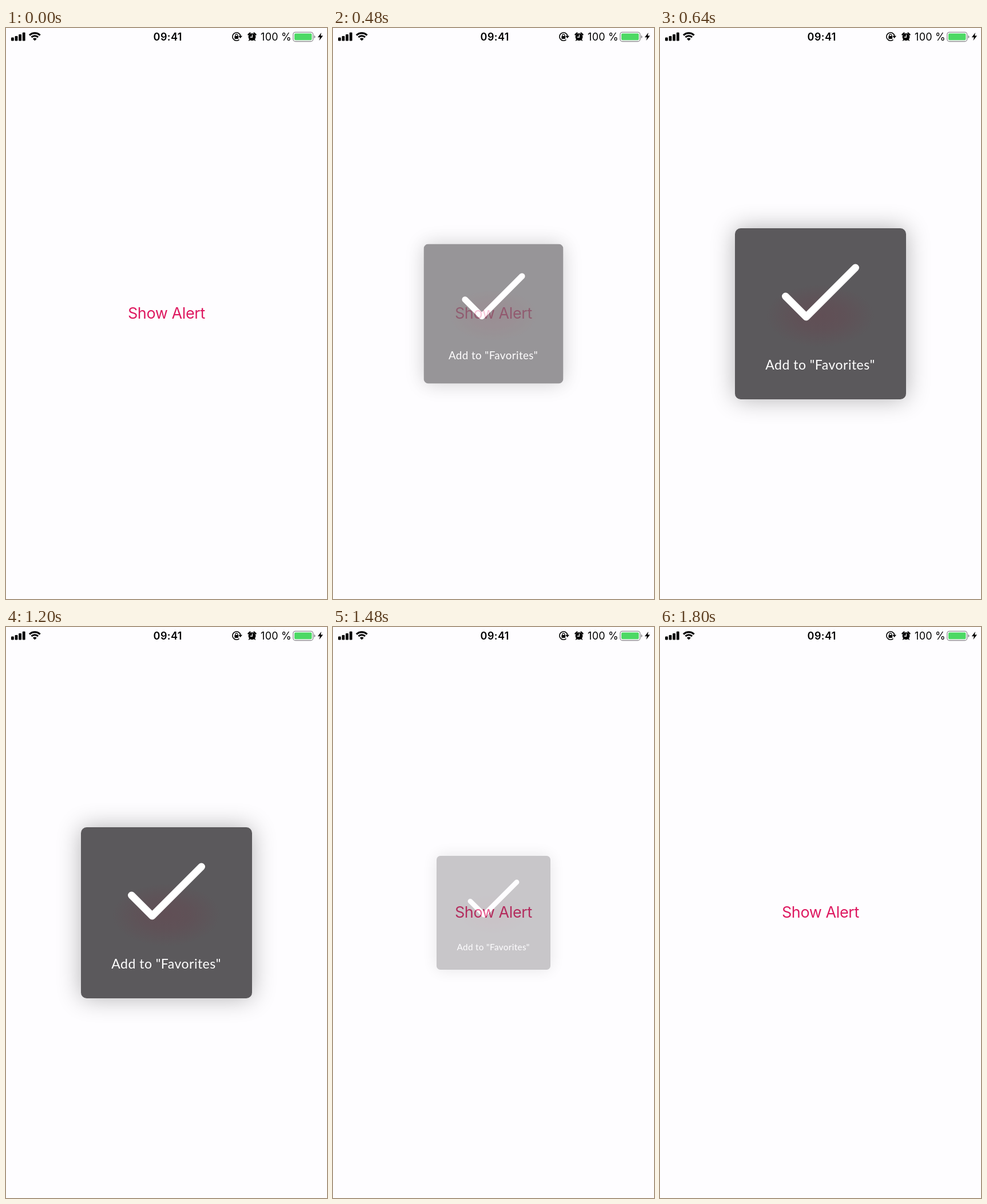
Animation of 561x998 px, one loop 2000 ms. Source, as an HTML page:

```html
<!DOCTYPE html>
<html lang="en">
<head>
<meta charset="utf-8">
<title>Alert</title>
<style>
  @property --p {
    syntax: "<number>";
    inherits: false;
    initial-value: 0;
  }

  html, body {
    margin: 0;
    width: 100%;
    height: 100%;
    overflow: hidden;
    background: #fefdff;
  }

  svg { display: block; }

  .screen {
    position: absolute;
    left: 0;
    top: 0;
  }

  .status text {
    font: 400 18px Inter, Roboto, sans-serif;
    text-anchor: middle;
    letter-spacing: .2px;
  }

  .status .clock {
    font-weight: 600;
    letter-spacing: .4px;
  }

  .button {
    font: 400 27px Inter, Roboto, sans-serif;
    letter-spacing: -.4px;
    text-anchor: middle;
    fill: #de1a61;
    animation: press 2s step-end infinite;
  }

  .alert {
    position: absolute;
    left: 131px;
    top: 349.5px;
    width: 299px;
    height: 299px;
    border-radius: 10px;
    background:
      radial-gradient(95px 55px at 149px 153px, rgba(110, 55, 70, .3), rgba(110, 55, 70, .22) 45%, rgba(110, 55, 70, 0)),
      #5b595c;
    box-shadow: 0 0 42px rgba(0, 0, 0, .3);
    opacity: var(--p);
    transform: scale(calc(.5 + .5 * var(--p)));
    animation: pop 2s step-end infinite;
  }

  .alert text {
    font: 400 23px Lato, "Open Sans", sans-serif;
    letter-spacing: .5px;
    text-anchor: middle;
    fill: #fff;
  }

  /* eased in and out, sampled every 40 ms */
  @keyframes pop {
    0%  { --p: 0; }
    20% { --p: .05; }
    22% { --p: .29; }
    24% { --p: .632; }
    26% { --p: .917; }
    28% { --p: 1; }
    70% { --p: .93; }
    72% { --p: .67; }
    74% { --p: .331; }
    76% { --p: .06; }
    78%, 100% { --p: 0; }
  }

  @keyframes press {
    0%  { opacity: 1; }
    10% { opacity: .85; }
    12% { opacity: .6; }
    14% { opacity: .38; }
    16% { opacity: .25; }
    18% { opacity: .21; }
    20% { opacity: .29; }
    22% { opacity: .45; }
    24% { opacity: .65; }
    26% { opacity: .82; }
    28% { opacity: .94; }
    30%, 100% { opacity: 1; }
  }
</style>
</head>
<body>
<svg class="screen" width="561" height="998" viewBox="0 0 561 998">
  <g class="status">
    <!-- signal -->
    <rect x="9" y="16.5" width="4.8" height="6" rx="1.2"/>
    <rect x="15.6" y="14" width="4.8" height="8.5" rx="1.2"/>
    <rect x="22.2" y="11" width="4.8" height="11.5" rx="1.2"/>
    <rect x="28.8" y="7.8" width="4.8" height="14.7" rx="1.2"/>

    <!-- wifi -->
    <g fill="none" stroke="#000" stroke-width="3.1">
      <path d="M41 12.7A13.2 13.2 0 0 1 59.6 12.7"/>
      <path d="M44.5 16.2A8.2 8.2 0 0 1 56.1 16.2"/>
    </g>
    <path d="M50.3 22.3L46.9 18.9A4.8 4.8 0 0 1 53.7 18.9Z"/>

    <text class="clock" x="282.7" y="21.6">09:41</text>

    <!-- rotation lock -->
    <path d="M409.8 14A7 7 0 1 0 407.5 20.3" fill="none" stroke="#000" stroke-width="1.6"/>
    <path d="M406.2 13.8H413L409.6 18Z"/>
    <rect x="399.4" y="14" width="6.8" height="5" rx=".7"/>
    <path d="M400.8 14.5V12.8A2 2 0 0 1 404.8 12.8V14.5" fill="none" stroke="#000" stroke-width="1.2"/>

    <!-- alarm -->
    <circle cx="430" cy="15.6" r="6.4"/>
    <path d="M423.3 11.6L426.6 8.7M436.7 11.6L433.4 8.7" stroke="#000" stroke-width="2.2" stroke-linecap="round"/>
    <path d="M426 20L424.8 21.8M434 20L435.2 21.8" stroke="#000" stroke-width="1.6" stroke-linecap="round"/>
    <path d="M430.4 11.5V16H426.8" fill="none" stroke="#fff" stroke-width="1.3"/>

    <text x="472" y="21.6">100 %</text>

    <!-- battery -->
    <rect x="501.8" y="7.3" width="34.9" height="16.2" rx="4" fill="none" stroke="#8f8f92" stroke-width="1.3"/>
    <rect x="504" y="9.5" width="30.5" height="11.8" rx="2" fill="#4cd964"/>
    <path d="M538.3 12.8Q540.6 13.4 540.6 15.4T538.3 18Z" fill="#8f8f92"/>
    <path d="M551.2 8L544.8 16.2H548.8L547.4 22L554 13.6H550Z"/>
  </g>
  <text class="button" x="280.4" y="508.4">Show Alert</text>
</svg>

<div class="alert">
  <svg width="299" height="299" viewBox="0 0 299 299">
    <path d="M88.5 119L124.5 155L210.5 69" fill="none" stroke="#fff" stroke-width="13"
      stroke-linecap="round" stroke-linejoin="round"/>
    <text x="149" y="247.3">Add to "Favorites"</text>
  </svg>
</div>
</body>
</html>
```
